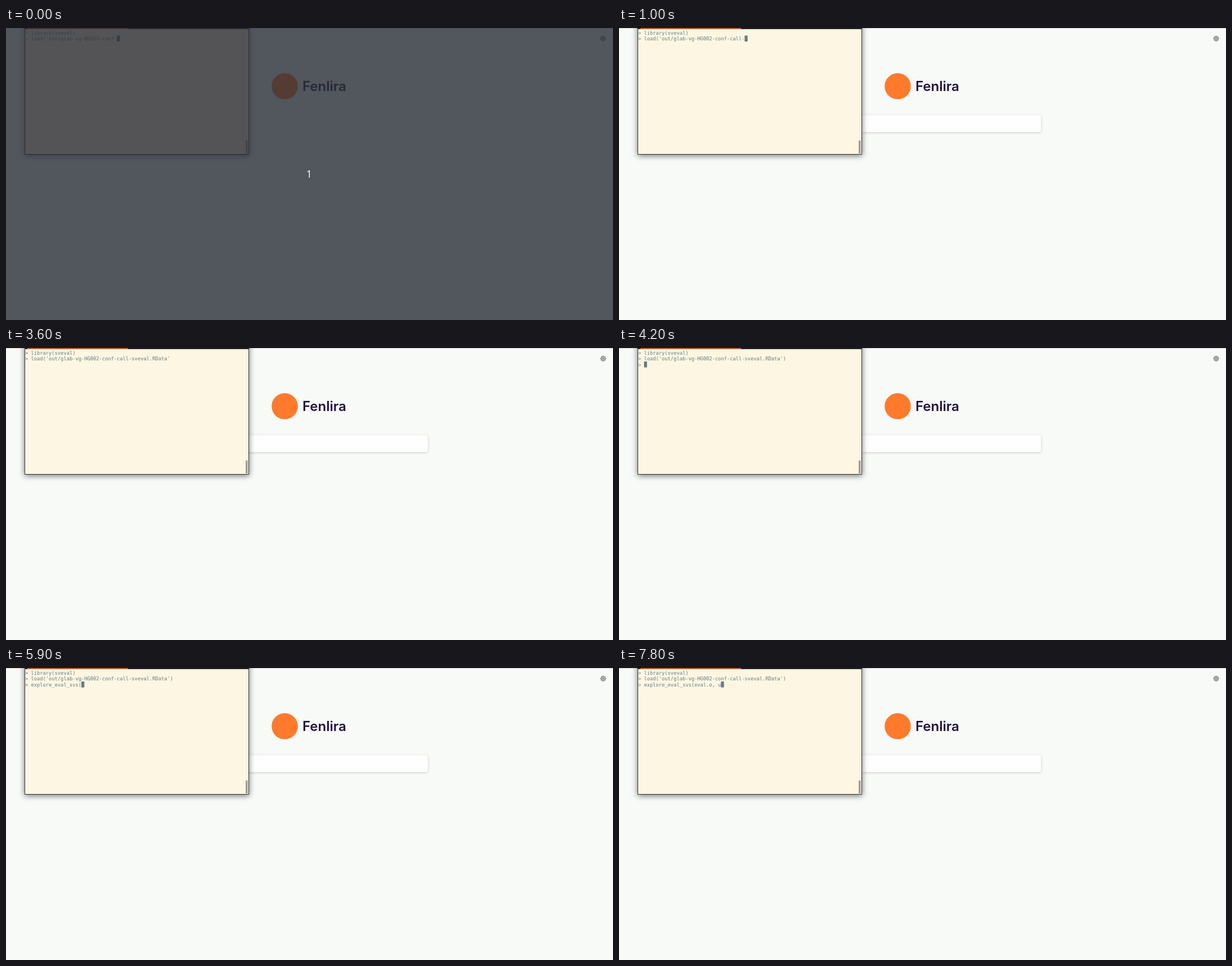
An HTML page with a canvas for the animation above (8000 ms loop, 1079 by 519 pixels).

```html
<!DOCTYPE html>
<html lang="en">
<head>
<meta charset="utf-8">
<title>Terminal session</title>
<style>
  html, body { margin: 0; width: 100%; height: 100%; overflow: hidden; background: #f8faf8; }
  canvas { display: block; }
</style>
</head>
<body>
<canvas id="stage" width="1079" height="519"></canvas>
<script>
const W = 1079, H = 519, LOOP = 8000;
const g = document.getElementById('stage').getContext('2d');
const CELL = 5.26, ROW = 10.5, LEFT = 34, TOP = 3, KEY = 100;
const INK = '#657b83';

const OPENING = "> library(sveval)\n> load('out/glab-vg-HG002-conf-";
const key = (at, text) => ({ at, text, pace: KEY });      // one character per beat
const complete = (at, text) => ({ at, text, pace: 0 });   // all at once
const typing = [
  key(600, 'call-'),
  key(2800, 'sv'),
  complete(3100, "eval.RData'"),
  key(3900, ')'),
  complete(4200, '\n> '),
  key(4900, 'expl'),
  complete(5400, 'ore_eval_svs'),
  key(5900, '('),
  key(6200, 'eval'),
  key(6700, '.'),
  key(6900, 'o'),
  key(7500, ', '),
  key(7800, 'u')
];
const blinks = [[1500, 2100], [3600, 3700], [4600, 4800], [7400, 7500]];

function typedAt(t) {
  let out = OPENING;
  for (const { at, text, pace } of typing) {
    if (t < at) break;
    out += pace ? text.slice(0, Math.floor((t - at) / pace) + 1) : text;
  }
  return out;
}

function rect(x, y, w, h, color) {
  g.fillStyle = color;
  g.fillRect(x, y, w, h);
}

function shadow(color, blur, dy) {
  g.shadowColor = color;
  g.shadowBlur = blur;
  g.shadowOffsetY = dy;
}

function label(text, x, y, font, color, align = 'left') {
  g.font = font;
  g.fillStyle = color;
  g.textAlign = align;
  g.fillText(text, x, y);
}

function gear(cx, cy) {
  g.strokeStyle = '#2b2a33';
  g.lineWidth = 1;
  g.beginPath();
  for (let i = 0; i <= 96; i++) {
    const a = i / 96 * Math.PI * 2;
    const r = 3.9 + 0.6 * Math.tanh(3 * Math.cos(8 * a));
    g.lineTo(cx + r * Math.cos(a), cy + r * Math.sin(a));
  }
  g.closePath();
  g.stroke();
  g.beginPath();
  g.arc(cx, cy, 1.6, 0, Math.PI * 2);
  g.stroke();
}

function page(dim) {
  rect(0, 0, W, H, '#f8faf8');
  rect(0, 0, W, 1, '#cbcccb');
  gear(1061.5, 18.8);

  g.fillStyle = '#ff7a2c';
  g.beginPath();
  g.arc(495.5, 103.5, 23.3, 0, Math.PI * 2);
  g.fill();
  label('Fenlira', 527, 112, '600 24px Inter, sans-serif', '#20123a');

  if (!dim) {
    g.save();
    shadow('rgba(0,0,0,.18)', 5, 1);
    g.fillStyle = '#fefefe';
    g.beginPath();
    g.roundRect(330, 155, 420, 30, 4);
    g.fill();
    g.restore();
  }
}

function typeLine(text, row) {
  const base = Math.round(TOP + row * ROW + 8.6);
  [...text].forEach((ch, i) =>
    label(ch, LEFT + i * CELL, base, '8.74px "DejaVu Sans Mono", monospace', INK));
}

function terminal(t, dim) {
  g.save();
  shadow('rgba(0,0,0,.55)', 10, 2);
  rect(33, -10, 399, 235, '#35322f');
  g.restore();
  rect(34, 2, 397, 222, dim ? '#fff0d8' : '#fcf6e2');
  rect(33, 0, 399, 2, '#241f1d');
  rect(38, 0, 179, 2, '#c05f43');
  rect(426, 200, 3.6, 23, '#a19f97');

  const lines = typedAt(t).split('\n');
  lines.forEach(typeLine);
  const row = lines.length - 1;
  const hidden = blinks.some(([off, on]) => t >= off && t < on);
  if (!hidden) rect(LEFT + lines[row].length * CELL, TOP + row * ROW, CELL, ROW, INK);
}

function draw(t) {
  const dim = t < 100;
  page(dim);
  terminal(t, dim);
  if (dim) {
    rect(0, 0, W, H, 'rgba(42,45,56,.8)');
    label('1', 539, 266, '18px "Open Sans", "Noto Sans", sans-serif', '#fff', 'center');
  }
}

const start = performance.now();
function tick() {
  draw((performance.now() - start) % LOOP);
  requestAnimationFrame(tick);
}
tick();
</script>
</body>
</html>
```
